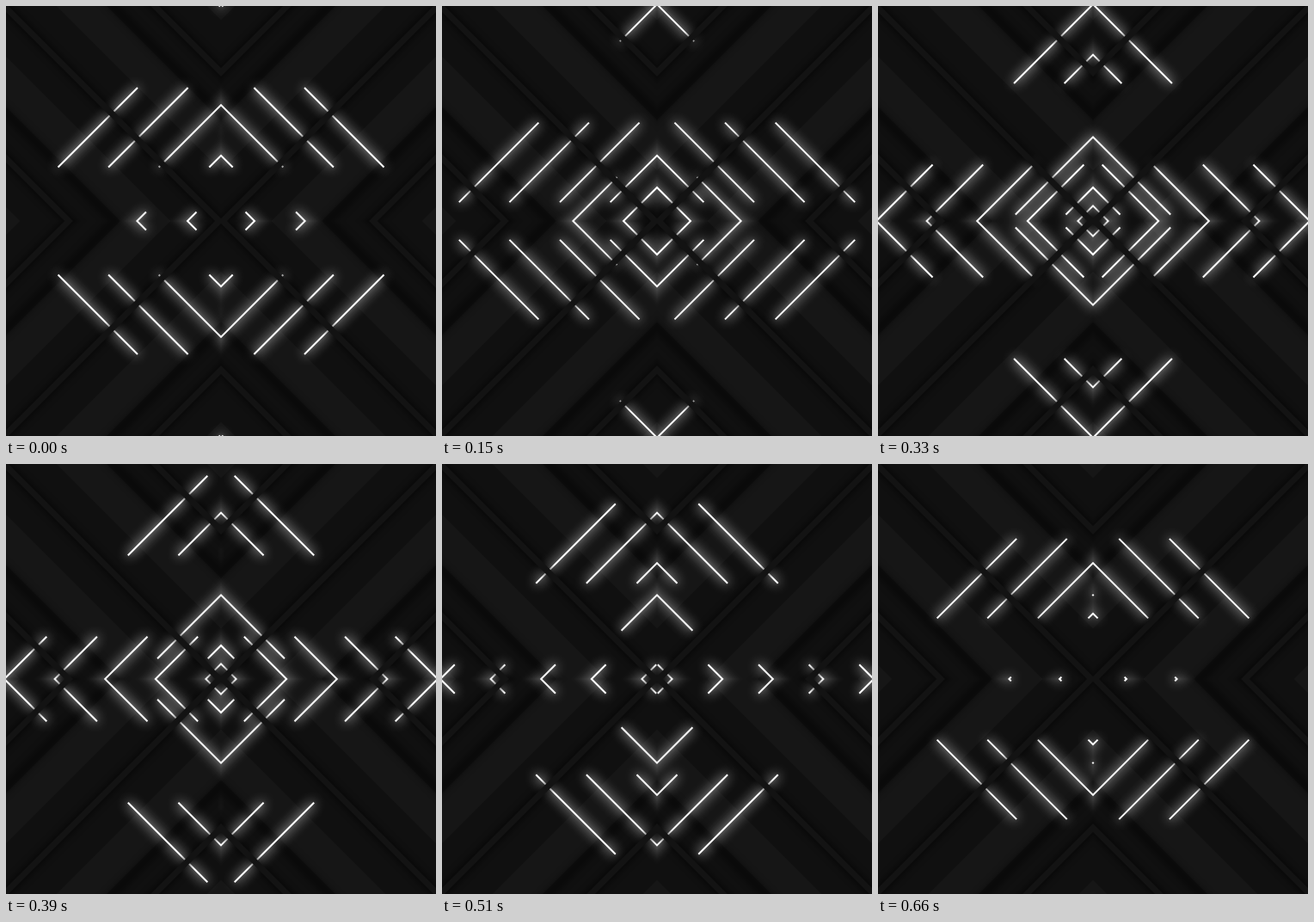
Write an HTML page that moves like this. It is 500 by 500 pixels and loops after 0.69 s.

```html
<!DOCTYPE html>
<html lang="en">
<head>
<meta charset="utf-8">
<title>Neon lattice</title>
<style>
  html, body { margin: 0; width: 100%; height: 100%; overflow: hidden; background: #101010; }
  /* The dash offset is inherited by every line in all four quadrants. */
  svg { display: block; width: 100vw; height: 100vh; fill: none; animation: run 690ms steps(23) infinite; }
  @keyframes run {
    from { stroke-dashoffset: 0; }
    to { stroke-dashoffset: -187px; }
  }
  .band { stroke: #161616; stroke-width: 41.4; }
  .shade { stroke: #000; stroke-width: 9; opacity: .5; filter: url(#soft); }
  .dash { stroke: #fff; stroke-width: 2; stroke-dasharray: 92.5 94.5; }
  .glow { stroke-width: 3.4; filter: url(#glow); }
  .halo { opacity: .2; filter: url(#halo); }
  .cast { stroke: #000; stroke-width: 10; opacity: .65; filter: url(#soft); }
  .strip { stroke: #131313; stroke-width: 7; }
</style>
</head>
<body>
<svg viewBox="0 0 500 500">
  <defs>
    <filter id="glow" filterUnits="userSpaceOnUse" x="-40" y="-40" width="330" height="330" color-interpolation-filters="sRGB">
      <feGaussianBlur stdDeviation="7"/>
    </filter>
    <filter id="halo" filterUnits="userSpaceOnUse" x="-40" y="-40" width="330" height="330" color-interpolation-filters="sRGB">
      <feGaussianBlur stdDeviation="2.2"/>
    </filter>
    <filter id="soft" filterUnits="userSpaceOnUse" x="-40" y="-40" width="330" height="330" color-interpolation-filters="sRGB">
      <feGaussianBlur stdDeviation="4"/>
    </filter>
    <clipPath id="cut"><path d="M0 0H250V250H0Z"/></clipPath>

    <path id="diag" d="M-300 -300L600 600"/>
    <path id="down" d="M92 -92l-561 561" pathLength="561"/>
    <path id="up" d="M-332 332l561 -561" pathLength="561"/>

    <g id="lines">
      <use href="#down" x="248"/>
      <use href="#down" x="306.6"/>
      <use href="#down" x="365.2"/>
      <use href="#down" x="423.8"/>
      <use href="#down" x="482.4"/>
      <use href="#up" x="402.4"/>
      <use href="#up" x="461"/>
    </g>
    <g id="strips">
      <use href="#diag" x="-177"/>
      <use href="#diag" x="-2"/>
      <use href="#diag" x="173"/>
    </g>

    <g id="quad" clip-path="url(#cut)">
      <g class="band">
        <use href="#diag" x="-263"/>
        <use href="#diag" x="-88"/>
        <use href="#diag" x="88"/>
        <use href="#diag" x="263"/>
      </g>
      <g class="dash glow"><use href="#lines"/></g>
      <g class="dash halo"><use href="#lines"/></g>
      <g class="shade">
        <use href="#diag" x="-124"/>
        <use href="#diag" x="124"/>
      </g>
      <g class="dash"><use href="#lines"/></g>
      <g class="cast"><use href="#strips"/></g>
      <g class="strip"><use href="#strips"/></g>
    </g>
  </defs>

  <path fill="#101010" d="M0 0H500V500H0Z"/>
  <use href="#quad"/>
  <use href="#quad" transform="matrix(-1 0 0 1 500 0)"/>
  <use href="#quad" transform="matrix(1 0 0 -1 0 500)"/>
  <use href="#quad" transform="matrix(-1 0 0 -1 500 500)"/>
</svg>
</body>
</html>
```
